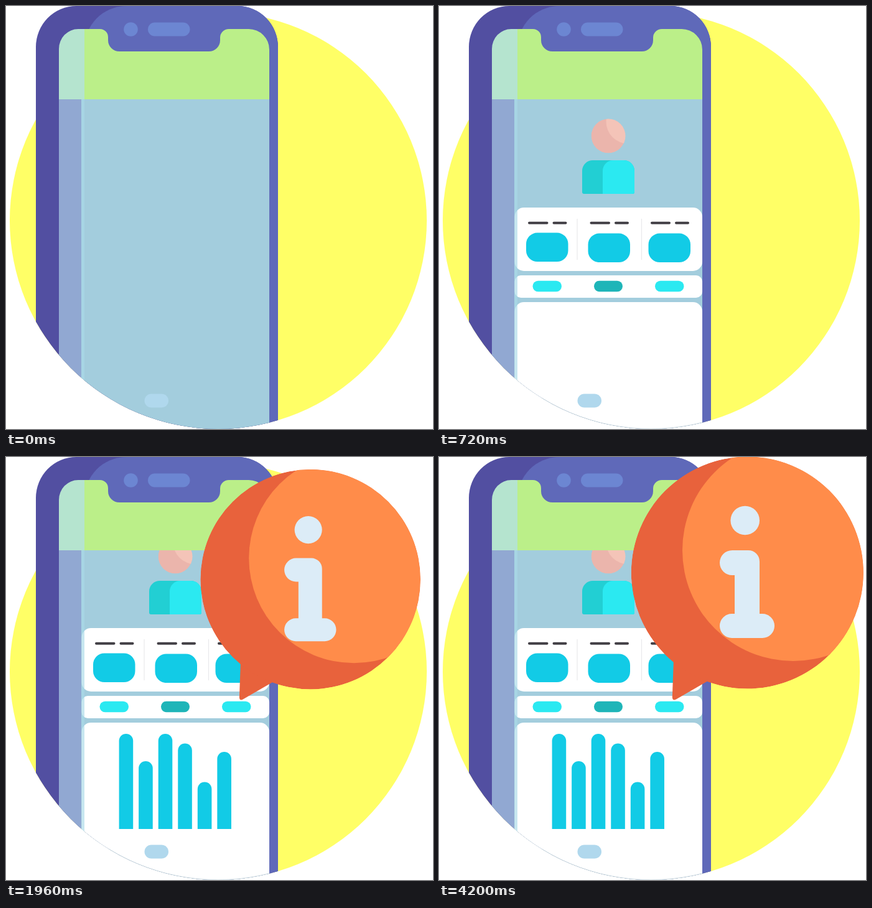
An HTML page that plays this animation: 686x680 px, repeating every 4.44 s.

```html
<!DOCTYPE html>
<html lang="en">
<head>
<meta charset="utf-8">
<title>Phone info</title>
<style>
html, body { margin: 0; width: 100%; height: 100%; overflow: hidden; background: #fff; }
svg { display: block; width: 686px; height: 680px; }
</style>
</head>
<body>
<svg viewBox="0 0 686 680">
  <defs>
    <clipPath id="stage"><path d="M0 0H686V345H676A335 335 0 0 1 6 345H0Z"/></clipPath>
    <clipPath id="view"><path d="M121 150H423V680H121Z"/></clipPath>
    <clipPath id="face"><circle cx="272" cy="160" r="27.5"/></clipPath>
    <clipPath id="ball"><circle cx="495.3" cy="186" r="186.5"/></clipPath>
    <clipPath id="glass">
      <path d="M85 69A31 32 0 0 1 116 37H151A13 13 0 0 1 164 50V55A18 18 0 0 0 182 73H326A18 18 0 0 0 344 55V51A14 14 0 0 1 358 37H390A33 33 0 0 1 423 70V680H85Z"/>
    </clipPath>
  </defs>

  <circle cx="341" cy="345" r="335" fill="#ffff66"/>

  <g clip-path="url(#stage)">
    <path d="M48 680V66A65 66 0 0 1 113 0H372A65 66 0 0 1 437 66V680Z" fill="#524fa1"/>
    <path d="M126 680V70C126 30 155 0 195 0H372A65 66 0 0 1 437 66V680Z" fill="#5f69b9"/>
    <g fill="#6c86d2">
      <circle cx="200.5" cy="37.5" r="11.3"/>
      <rect x="228" y="26.5" width="67.5" height="22" rx="11"/>
    </g>

    <g clip-path="url(#glass)">
      <path d="M85 37H126V150H85Z" fill="#b5e4cf"/>
      <path d="M126 37H423V150H126Z" fill="#bbef89"/>
      <path d="M85 150H122V680H85Z" fill="#91a8d2"/>
      <path d="M121 150H423V680H121Z" fill="#a3cddd"/>
    </g>

    <g clip-path="url(#view)">
      <g id="page">
        <g clip-path="url(#face)">
          <circle cx="272" cy="160" r="27.5" fill="#ebb5ac"/>
          <circle cx="304" cy="137" r="35.5" fill="#f4c4b8"/>
        </g>
        <path d="M230 216A17 17 0 0 1 247 199H297A17 17 0 0 1 314 216V250Q314 253 311 253H233Q230 253 230 250Z" fill="#22cfd3"/>
        <path d="M263 253V216A17 17 0 0 1 280 199H297A17 17 0 0 1 314 216V250Q314 253 311 253Z" fill="#2be9f1"/>

        <g fill="#fff">
          <rect x="121.5" y="275" width="301.5" height="102" rx="15"/>
          <rect x="121.5" y="384" width="301.5" height="36" rx="10"/>
          <rect x="121.5" y="427" width="301.5" height="800" rx="15"/>
        </g>
        <path d="M222 293V359M325.5 293V359" stroke="#e9e9ec" stroke-width="1.2"/>
        <path d="M145 299.7H173.500M184.500 299.700H203.500M244.500 299.700H273M284 299.700H303M342 299.700H370M381 299.700H400" stroke="#423f45" stroke-width="4" stroke-linecap="round"/>
        <g fill="#12cbe6">
          <rect x="140" y="315.500" width="67.500" height="46.500" rx="18"/>
          <rect x="239.500" y="316.500" width="67.500" height="46.500" rx="18"/>
          <rect x="336.500" y="316.500" width="67.500" height="46.500" rx="18"/>
        </g>
        <rect x="150.500" y="392.700" width="46.500" height="17.500" rx="8.700" fill="#2be9f1"/>
        <rect x="249" y="392.700" width="46" height="17.500" rx="8.700" fill="#1eb5b8"/>
        <rect x="347" y="392.700" width="46.500" height="17.500" rx="8.700" fill="#2be9f1"/>
        <g id="bars" fill="#12cbe6"></g>
      </g>
      <path d="M121 150H126V680H121Z" fill="#a9dbe9" opacity=".65"/>
    </g>
    <rect x="222.500" y="623.500" width="38.500" height="22" rx="11" fill="#b0d8ed"/>
  </g>
  <path id="rim" d="M165 630A335 335 0 0 0 424 669" fill="none" stroke="#a3bcc8" stroke-width=".7" opacity=".6"/>

  <g id="bubble">
    <path d="M377 325L374.800 386Q375 392.500 381 389.500L432 360Z" fill="#e8623c"/>
    <g clip-path="url(#ball)">
      <circle cx="495.3" cy="186" r="186.5" fill="#e8623c"/>
      <circle cx="569" cy="150" r="178" fill="#ff8c4a"/>
    </g>
    <g fill="#dcecf7">
      <circle cx="491.7" cy="102" r="23.3"/>
      <path d="M471 150H497A18 18 0 0 1 515 168V252H519.500A19.500 19.500 0 0 1 519.500 291H470.500A19.500 19.500 0 0 1 470.500 252H475V190H471A20 20 0 0 1 471 150Z"/>
    </g>
  </g>
</svg>
<script>
const LOOP = 4440, TICK = 40, BASE = 598;
const HEIGHTS = [153, 109, 153, 137.5, 75.5, 124];
const TIP = [376.5, 390];
const $ = id => document.getElementById(id);

const bars = HEIGHTS.map(() => {
  const bar = document.createElementNS("http://www.w3.org/2000/svg", "path");
  return $("bars").appendChild(bar);
});

// Soft start, fast middle, long settle.
function swell(t, start) {
  const u = Math.min(1, Math.max(0, (t - start) / 880));
  return 1 - (1 - u ** 1.7) ** 6.68;
}

// Distance the page still has to travel upwards.
function pageOffset(t) {
  return t < 200 ? 700 : Math.max(0, 594.7 * Math.exp(-0.004317 * (t - 160)) - 4);
}

function barPath(x, h) {
  if (h < 0.5) return "";
  const r = 11.3, ry = Math.min(r, h);
  return `M${x} ${BASE}v${ry - h}a${r} ${ry} 0 0 1 ${2 * r} 0V${BASE}Z`;
}

function draw(t) {
  const dy = pageOffset(t);
  $("page").setAttribute("transform", `translate(0 ${dy})`);
  $("rim").style.display = dy < 220 ? "" : "none";

  bars.forEach((bar, i) => {
    const grow = swell(t, i % 2 ? 1000 : 920);
    bar.setAttribute("d", barPath(181.6 + 31.55 * i, HEIGHTS[i] * grow));
  });

  const s = swell(t, 1480), [x, y] = TIP;
  $("bubble").style.display = s > 0 ? "" : "none";
  $("bubble").setAttribute("transform", `translate(${x} ${y}) scale(${s}) translate(${-x} ${-y})`);
}

const began = performance.now();
function loop() {
  const t = (performance.now() - began) % LOOP;
  draw(Math.floor(t / TICK) * TICK);
  requestAnimationFrame(loop);
}
loop();
</script>
</body>
</html>
```
